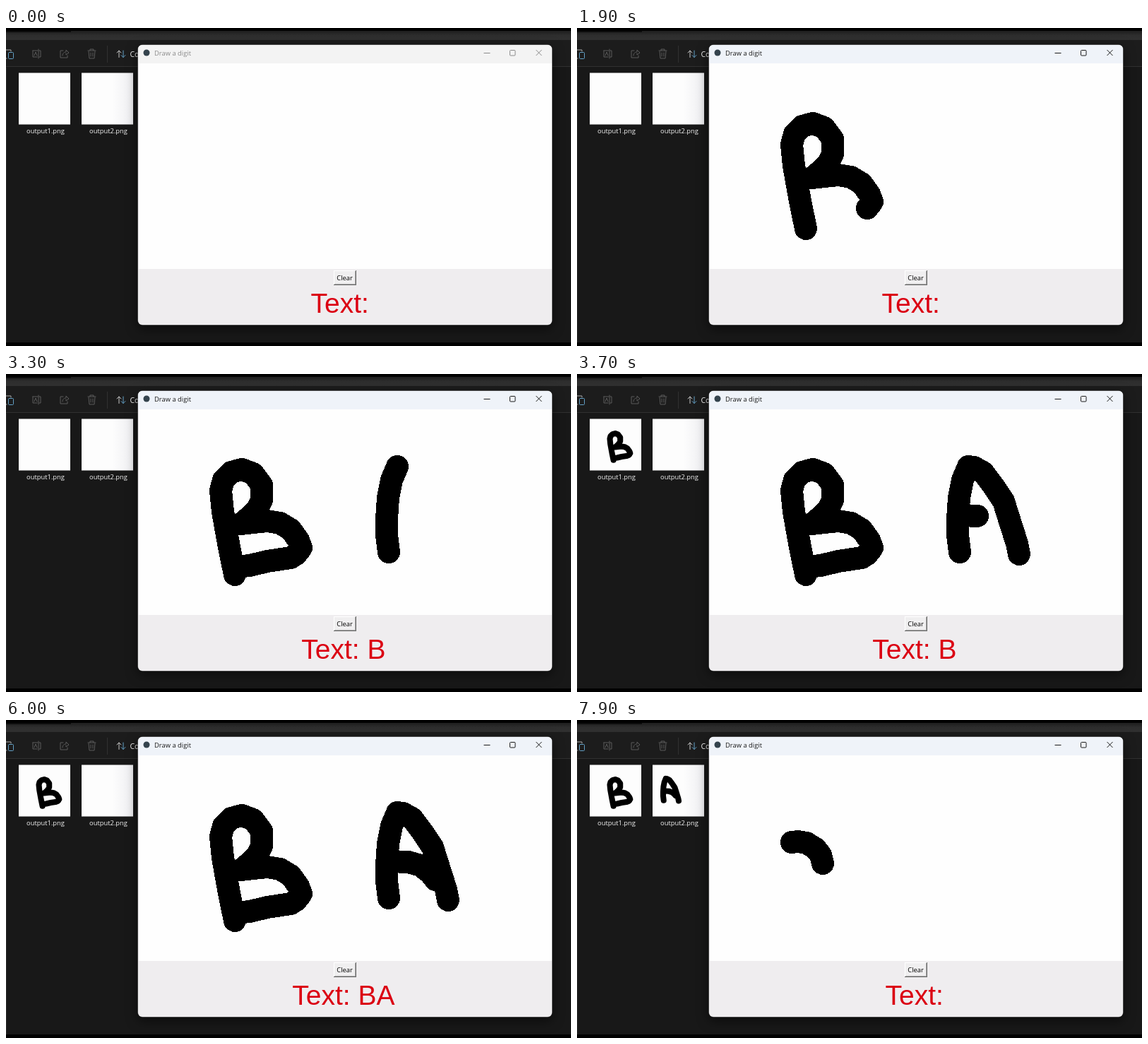
These frames come from a looping animation (800x450 px, 8 s). An HTML page:

```html
<!DOCTYPE html>
<html lang="en">
<head>
<meta charset="utf-8">
<title>Draw a digit</title>
<style>
html, body { margin: 0; width: 100%; height: 100%; overflow: hidden; background: #000; }
svg { display: block; width: 800px; height: 450px; }
text { font: 9.4px "Open Sans", "Noto Sans", sans-serif; }
.ink { fill: none; stroke: #000; stroke-width: 32; stroke-linecap: round; stroke-linejoin: round; }
.icon { fill: none; stroke: #5b5b5b; stroke-linecap: round; stroke-linejoin: round; }
#result { font: 39px "Liberation Sans", Arial, sans-serif; fill: #db0012; }
#frame { filter: drop-shadow(0 5px 8px rgba(0, 0, 0, .55)); }
#controls { fill: none; stroke: currentColor; }
</style>
</head>
<body>
<svg viewBox="0 0 800 450">
  <defs>
    <linearGradient id="shade">
      <stop offset=".6" stop-color="#fdfdfd"/><stop offset="1" stop-color="#eeeef1"/>
    </linearGradient>
    <linearGradient id="tabs" x2="0" y2="1">
      <stop offset="0" stop-color="#1d1d1d"/><stop offset=".5" stop-color="#2e2e2e"/><stop offset="1" stop-color="#303030"/>
    </linearGradient>
    <clipPath id="round"><rect x="187" y="24" width="586" height="396" rx="6"/></clipPath>
  </defs>

  <!-- file browser -->
  <rect width="800" height="450" fill="#000"/>
  <rect y="4" width="800" height="13" fill="url(#tabs)"/>
  <rect y="4" width="92" height="2" fill="#0c0c0c"/>
  <rect y="17" width="800" height="38" fill="#1c1c1c"/>
  <rect y="55" width="800" height="390" fill="#181818"/>
  <path d="M0 54.5H800M143.5 25V49" stroke="#303030"/>
  <path d="M.5 56V445" stroke="#292929"/>
  <g class="icon">
    <path d="M38 32H45M38 32V41H44M47 32H49V41H47M46 30V43M40 39L42 34L44 39"/>
    <path d="M81 32H77V42H87V39M80 39C80 35 83 34 85 34V31L89 35L85 38V36"/>
    <path d="M116 32H127M119 32V30H124V32M117 33L118 43H125L126 33M120 35V40M123 35V40"/>
    <path d="M-1 31H7V33M-1 43H1" stroke="#a9a9a9"/>
    <rect x="3.5" y="34.5" width="7" height="9" rx="1" stroke="#629fc4"/>
    <path d="M160 41.5V32M157 35L160 32L163 35" stroke="#c6c6c6"/>
    <path d="M166 32V41.5M163 38.500L166 41.5L169 38.500" stroke="#629fc4"/>
  </g>
  <text x="175.500" y="40.500" style="font-size:10.500px" fill="#f2f2f2">Co</text>
  <rect x="18" y="63.500" width="73" height="73" fill="#fdfdfd"/>
  <rect x="107" y="63.500" width="73" height="73" fill="url(#shade)"/>
  <g id="thumbB" transform="translate(-30.4 49.9) scale(.253)"></g>
  <g id="thumbA" transform="translate(-14.4 49.9) scale(.253)"></g>
  <g fill="#f0f0f0" text-anchor="middle">
    <text x="56" y="149">output1.png</text>
    <text x="145" y="149">output2.png</text>
  </g>

  <!-- drawing window -->
  <rect id="frame" x="186.500" y="23.500" width="587" height="397" rx="7" fill="#777"/>
  <g clip-path="url(#round)">
    <rect x="187" y="24" width="586" height="396" fill="#efedef"/>
    <rect id="bar" x="187" y="24" width="586" height="26"/>
    <rect x="188" y="50" width="585" height="291" fill="#fefefe"/>
  </g>
  <circle cx="199" cy="35" r="4.500" fill="#34434d"/>
  <g id="controls">
    <text x="210" y="38.700" fill="currentColor" stroke="none">Draw a digit</text>
    <path d="M676.500 35.500H685.500M750.500 31L758.500 39M758.500 31L750.500 39"/>
    <rect x="713.500" y="31.500" width="7.500" height="7.500" rx="1"/>
  </g>
  <g id="canvas" shape-rendering="crispEdges"></g>
  <rect x="464" y="343" width="32" height="21" fill="#6b6b6b"/>
  <rect x="464" y="343" width="31" height="20" fill="#fff"/>
  <rect x="465" y="344" width="30" height="19" fill="#a2a2a2"/>
  <rect x="465" y="344" width="29" height="18" fill="#f0eff0"/>
  <text x="479.600" y="356.700" text-anchor="middle" fill="#000">Clear</text>
  <text id="result" y="403"></text>
</svg>

<script>
const LOOP = 8000, STEP = 100, CLEAR = 6800;
const $ = id => document.getElementById(id);

// Pen strokes: start and end time in ms, then the pen's path
const strokes = [
  { letter: "B", from: 850, to: 1900, path: "324,284 316,245 307,195 304,165 308,150 319,139 334,135 350,141 362,157 362,178 356,191 345,202 333,212 350,210 370,208 388,211 403,220 414,235 418,246 411,255" },
  { letter: "B", from: 1900, to: 2100, path: "411,255 403,260 370,265 345,271 335,272" },
  { letter: "A", from: 2950, to: 3300, path: "542,252 539,228 539,205 541,175 546,150 554,131" },
  { letter: "A", from: 3300, to: 3550, path: "554,131 562,132 575,139 590,159 604,180 615,215 623,240 626,255" },
  { letter: "A", from: 3600, to: 3900, path: "542,200 570,201 587,206 600,216 608,226" },
  { from: 7550, to: 7900, path: "304,173 313,172 325,174 338,182 345,191 348,203" }
];

// Recognised text: time, left edge, words
const results = [
  [0, 431.5, "Text:"], [2600, 418.2, "Text: B"],
  [6000, 405.2, "Text: BA"], [CLEAR, 436.6, "Text:"]
];

function addLine(parent, path) {
  const line = document.createElementNS("http://www.w3.org/2000/svg", "polyline");
  line.setAttribute("points", path);
  line.setAttribute("class", "ink");
  parent.append(line);
  return line;
}

for (const s of strokes) {
  s.line = addLine($("canvas"), s.path);
  s.length = s.line.getTotalLength();
  if (s.letter) addLine($("thumb" + s.letter), s.path);
}

const show = (el, on) => el.setAttribute("visibility", on ? "visible" : "hidden");

function draw(t) {
  const focused = t >= 900;
  $("bar").setAttribute("fill", focused ? "#eff3f9" : "#f3f3f3");
  $("controls").style.color = focused ? "#1b1b1b" : "#8b8b8b";

  for (const s of strokes) {
    const p = Math.min(1, (t - s.from) / (s.to - s.from));
    show(s.line, p > 0 && (t < CLEAR || s.from > CLEAR));
    s.line.style.strokeDasharray = p < 1 ? `${Math.max(0, p) * s.length} 2000` : "none";
  }
  show($("thumbB"), t >= 3400);
  show($("thumbA"), t >= 6700);

  const [, x, words] = results.findLast(r => t >= r[0]);
  $("result").setAttribute("x", x);
  $("result").textContent = words;
}

const start = performance.now();
function tick() {
  const t = (performance.now() - start) % LOOP;
  draw(Math.floor(t / STEP) * STEP);
  requestAnimationFrame(tick);
}
tick();
</script>
</body>
</html>
```
